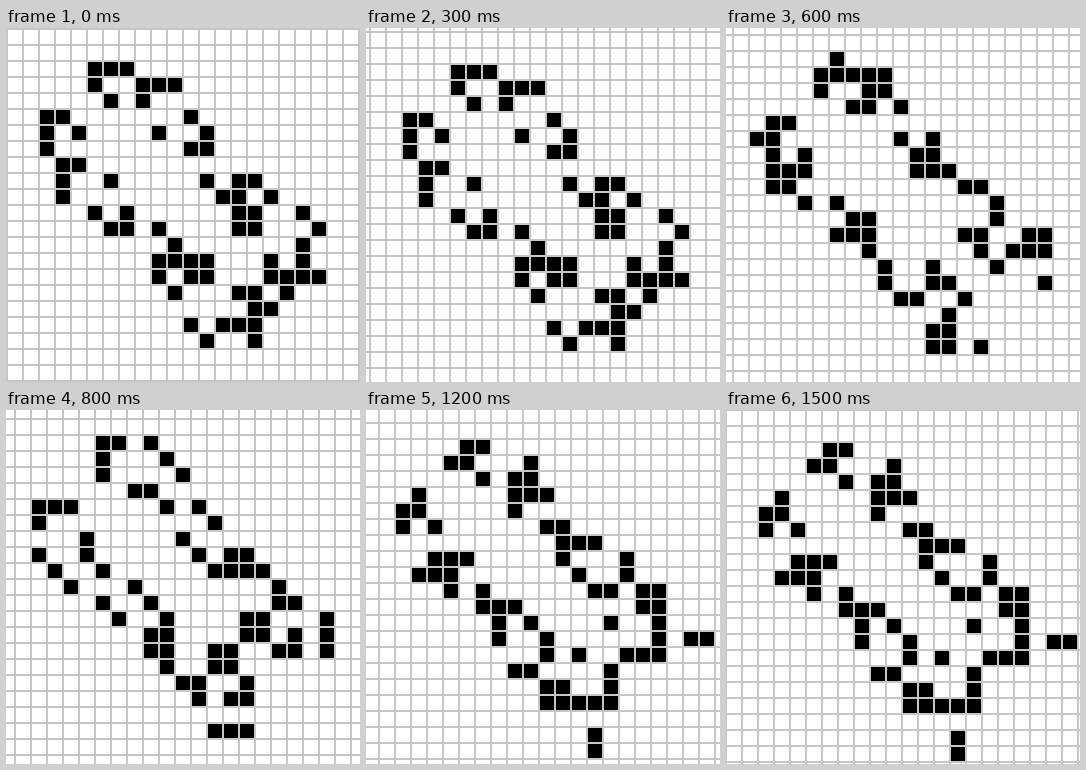
Write an HTML page that moves like this. It is 354 by 354 pixels and loops after 1600 ms.

```html
<!DOCTYPE html>
<html lang="en">
<head>
<meta charset="utf-8">
<title>Glider loop</title>
<style>
  html, body { margin: 0; width: 100%; height: 100%; overflow: hidden; background: #fff; }
  svg { display: block; width: 354px; height: 354px; }
</style>
</head>
<body>
<svg viewBox="0 0 354 354" shape-rendering="crispEdges">
  <rect width="354" height="354" fill="#fff"/>
  <g id="board">
    <path id="grid" fill="#c6c6c6"/>
    <path id="cells" fill="#000"/>
  </g>
</svg>
<script>
const PITCH = 16, LINE = 2, SIZE = 354, N = 24;
const STEP = 100, STEPS = 16, STEPS_PER_GEN = 4;

// Upper half of a pattern symmetric about its diagonal: row -> columns >= row.
const HALF = {
  2: [5, 6, 7], 3: [5, 8, 9, 10], 4: [6, 8], 5: [11], 6: [9, 12],
  7: [11, 12], 9: [12, 14, 15], 10: [13, 14, 16], 11: [14, 15, 18],
  12: [14, 15, 19], 13: [18], 14: [16, 18], 15: [16, 17, 18, 19], 16: [17]
};

const emptyBoard = () => Array.from({ length: N }, () => Array(N).fill(0));

function seed() {
  const b = emptyBoard();
  for (const r in HALF) for (const c of HALF[r]) b[r][c] = b[c][r] = 1;
  return b;
}

function neighbours(b, r, c) {
  let n = -b[r][c];
  for (let y = r - 1; y <= r + 1; y++)
    for (let x = c - 1; x <= c + 1; x++)
      n += (b[y] && b[y][x]) || 0;
  return n;
}

// Conway's rule: born with 3, survives with 2 or 3.
const evolve = b => b.map((row, r) => row.map((on, c) => {
  const n = neighbours(b, r, c);
  return n === 3 || (on && n === 2) ? 1 : 0;
}));

const box = (x, y, w, h) => `M${x} ${y}h${w}v${h}h${-w}z`;

function cellPath(b) {
  const side = PITCH - LINE;
  let d = "";
  b.forEach((row, r) => row.forEach((on, c) => {
    if (on) d += box(c * PITCH + LINE, r * PITCH + LINE, side, side);
  }));
  return d;
}

function gridPath() {
  const span = SIZE + 2 * PITCH;
  let d = "";
  for (let p = -PITCH; p < SIZE; p += PITCH)
    d += box(p, -PITCH, LINE, span) + box(-PITCH, p, span, LINE);
  return d;
}

const board = document.getElementById("board");
const cells = document.getElementById("cells");
document.getElementById("grid").setAttribute("d", gridPath());

const gens = [];
for (let b = seed(); gens.length < STEPS / STEPS_PER_GEN; b = evolve(b)) gens.push(cellPath(b));

// The view slides one pixel per step to follow the ship's one cell per four generations.
function draw(ms) {
  const step = Math.floor(ms / STEP) % STEPS;
  board.setAttribute("transform", `translate(${step} ${step})`);
  cells.setAttribute("d", gens[Math.floor(step / STEPS_PER_GEN)]);
}

const start = performance.now();
function tick() {
  draw(performance.now() - start);
  requestAnimationFrame(tick);
}
tick();
</script>
</body>
</html>
```
